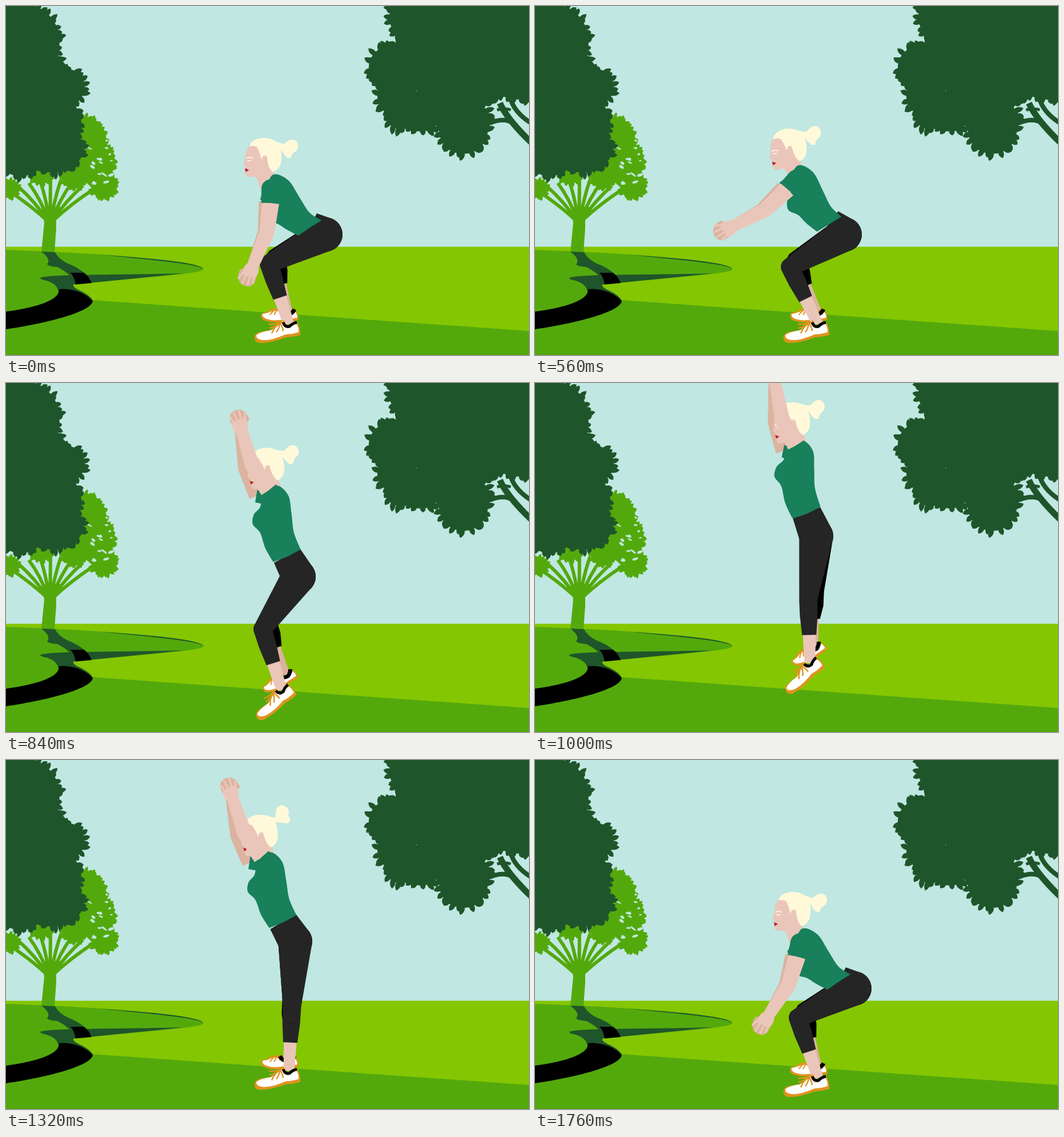
Write an HTML page that moves like this. It is 917 px wide and 611 px high and loops after 1.8 s.

```html
<!DOCTYPE html>
<html lang="en">
<head>
<meta charset="utf-8">
<title>Squat jump</title>
<style>
html, body { margin: 0; width: 100%; height: 100%; overflow: hidden; background: #c0e7e2; }
svg { display: block; width: 100%; height: 100%; }
</style>
</head>
<body>
<svg viewBox="0 0 917 611">
  <rect width="917" height="611" fill="#c0e7e2"/>
  <rect y="421.500" width="917" height="190" fill="#84c602"/>

  <g fill="#53a90c">
    <path d="M0 427C130 431 346 444 346 461C346 470 190 479 118 488Q118 495 135 503L152 515L917 569V611H0Z"/>
    <path id="crown"/>
    <path d="M62 431L67 380L64 352L98 352L88 372L88 390L85 431Z"/>
    <path id="branches" fill="none" stroke="#53a90c" stroke-width="6"/>
  </g>
  <g id="holes" fill="#c0e7e2"></g>

  <g fill="#1f552a">
    <path d="M62 430L86 431Q94 446 116 454Q142 466 150 484L122 487Q116 470 90 457Q74 456 72 452Q80 444 62 430Z"/>
    <path d="M60 476C70 469 200 471 312 468L150 484.500L122 487Q112 488 125 496Q148 506 152 516L92 498Q88 486 72 481Q60 479 60 476Z"/>
    <path d="M170 436C260 442 345 450 346 461C342 452 260 445 170 436Z"/>
    <path id="leftTree"/>
    <path id="rightTree"/>
    <g fill="none" stroke="#1f552a">
      <path stroke-width="11" d="M866 170Q878 198 922 240"/>
      <path stroke-width="8" d="M848 205Q874 194 890 206M884 160Q890 186 922 206"/>
      <path stroke-width="5" d="M861 182Q875 178 885 182M848 208V192"/>
    </g>
  </g>
  <path d="M113 467L137 467Q146 474 150 485L122 487.500Q120 474 113 467Z"/>
  <path d="M92 496C118 493 140 504 152 516C152 534 80 554 0 566V535C68 526 96 510 92 496Z"/>

  <g id="farShoe">
    <path fill="#e0931f" d="M448 538Q458 537 468 530L486 531L506 530Q515 541 512 550L490 553Q465 556 452 550Q445 546 448 538Z"/>
    <path fill="#fff" d="M450 539Q460 538 469 533L486 536L506 534Q512 541 510 546L486 549Q465 552 455 547Q449 544 450 539Z"/>
    <path fill="none" stroke="#e0931f" stroke-width="2" d="M461 533L480 530M463 541Q467 533 475 531M470 541L476 530L481 539"/>
  </g>
  <path id="farShin" fill="#dbb3a0"/>
  <path id="farCollar" fill="none" stroke="#000" stroke-width="7" d="M480 531Q486 541 497 540Q503 537 506 531"/>
  <path id="farLeg"/>
  <path id="farArm" fill="#dbb3a0"/>
  <path id="farSleeve" fill="#18805b"/>

  <g id="head">
    <path fill="#eac6ba" d="M428 242Q419 248 418 262L414.500 277L418 281L417 290L420 298Q429 300 435 297L440 306L444 320L471 314L466 284L450 246Z"/>
    <path fill="#fff9d9" d="M425 245Q428 232 448 230Q462 230 472 237L484 241L480 250Q483 268 478 280Q472 289 465 290Q459 284 457 274L455 262Q449 260 446 268Q442 253 438 246Q431 243 425 245Z"/>
    <path id="bun" fill="#fff9d9" d="M474 238L484 241L491 236Q500 230 507 236Q513 244 507 253Q499 256 497 265Q490 267 486 260Q483 255 480 250Z"/>
    <ellipse cx="451.500" cy="267" rx="4.500" ry="6" fill="#eac6ba"/>
    <path fill="none" stroke="#fff3e6" stroke-width="1.800" d="M419 266Q425 262 431 266M421 270L428 270"/>
    <path fill="#c1202b" d="M417 283L424 286.500L418 290Z"/>
  </g>

  <path id="shin" fill="#eac6ba"/>
  <g id="shoe">
    <path fill="#e0931f" d="M436 578Q438 571 449 570L465 567L482 554L487 550L493 560L510 551Q517 566 516 576Q502 580 491 580Q466 590 444 590Q434 588 436 578Z"/>
    <path fill="#fff" d="M439 576Q447 570 464 568Q476 561 485 553L492 562L508 554Q514 563 513 571Q501 575 490 575Q468 585 452 585Q438 584 439 576Z"/>
    <path fill="none" stroke="#e0931f" stroke-width="2.500" d="M461 557Q472 558 488 553M462 564Q473 562 480 555M466 573Q470 562 480 555M474 571Q479 565 480 555Q485 561 486 569"/>
    <path fill="none" stroke="#000" stroke-width="5" d="M486 554Q489 563 497 561Q503 555 510 554"/>
  </g>
  <path id="leg" fill="#252525"/>
  <path id="shirt" fill="#18805b"/>
  <path id="arm" fill="#eac6ba"/>
  <g id="hand" fill="#eac6ba">
    <path d="M-15 -9Q-17 5 -8 13Q2 19 12 13Q19 5 16 -8Q2 -16 -15 -9Z" fill="#dbb3a0"/>
    <path d="M-7 -22Q-13 -8 -8 -1L14 -2Q20 -10 15 -23Z"/>
    <path d="M-9 -4L-13 6M-2 -4L-4 13M5 -4L6 13M12 -5L14 7" fill="none" stroke="#eac6ba" stroke-width="3.500" stroke-linecap="round"/>
  </g>
  <path id="sleeve" fill="#18805b"/>
</svg>
<script>
const $ = id => document.getElementById(id);
const set = (id, name, value) => $(id).setAttribute(name, value);
const lerp = (a, b, p) => a + (b - a) * p;
const clamp = v => Math.min(1, Math.max(0, v));
const rad = a => a * Math.PI / 180;
const add = (p, q) => [p[0] + q[0], p[1] + q[1]];
const between = (p, q, k) => [lerp(p[0], q[0], k), lerp(p[1], q[1], k)];
const turn = ([x, y], a) => {
  const c = Math.cos(rad(a)), s = Math.sin(rad(a));
  return [x * c - y * s, x * s + y * c];
};

// ---- outlines ----
// Closed smooth outline; listed indices stay sharp
function curve(pts, corners) {
  const n = pts.length;
  const slope = i => corners.includes(i) ? [0, 0]
    : [0, 1].map(k => (pts[(i + 1) % n][k] - pts[(i + n - 1) % n][k]) / 6);
  let d = 'M' + pts[0];
  for (let i = 0; i < n; i++) {
    const j = (i + 1) % n, e = slope(j);
    d += `C${add(pts[i], slope(i))} ${pts[j][0] - e[0]},${pts[j][1] - e[1]} ${pts[j]}`;
  }
  return d + 'Z';
}

const dot = ([x, y], r) => `M${x - r} ${y}a${r} ${r} 0 1 0 ${2 * r} 0a${r} ${r} 0 1 0 ${-2 * r} 0Z`;

// Straight piece from a to b with a half width at each end
function taper(a, ra, b, rb) {
  const dx = b[0] - a[0], dy = b[1] - a[1], len = Math.hypot(dx, dy) || 1;
  const side = r => [-dy / len * r, dx / len * r];
  return `M${add(a, side(ra))}L${add(b, side(rb))}L${add(b, side(-rb))}L${add(a, side(-ra))}Z`;
}

// ---- scenery ----
function random(seed) {
  return () => (seed = (seed * 16807) % 2147483647) / 2147483647;
}

// Round clumps, each fringed with pointed leaves
function foliage(clumps, size, seed) {
  const rnd = random(seed);
  return clumps.map(([x, y, r]) => {
    let d = dot([x, y], r);
    const n = Math.round(r * 8 / size);
    for (let i = 0; i < n; i++) {
      const a = (i + rnd() * 0.6) / n * 360, tilt = a + (rnd() - 0.5) * 80;
      const root = add([x, y], turn([r - 3, 0], a)), l = size * (0.7 + rnd() * 0.6), w = size * 0.55;
      const at = (u, v) => add(root, turn([u, v], tilt)).map(c => c.toFixed(1));
      d += `M${at(0, w / 2)}Q${at(l * 0.6, w)} ${at(l, 0)}Q${at(l * 0.6, -w)} ${at(0, -w / 2)}Z`;
    }
    return d;
  }).join('');
}

set('leftTree', 'd', foliage([[28, 62, 66], [0, 150, 108], [60, 108, 38], [106, 142, 32],
  [84, 205, 48], [104, 252, 31], [82, 256, 36], [26, 250, 48]], 12, 23));
set('rightTree', 'd', foliage([[722, 18, 50], [674, 108, 38], [686, 158, 35], [692, 190, 26], [728, 184, 36],
  [802, 216, 43], [830, 196, 19], [790, 140, 62], [722, 95, 50], [820, 55, 112], [902, 78, 86]], 13, 47));
set('crown', 'd', foliage([[132, 236, 44], [152, 272, 39], [172, 314, 23], [120, 298, 22],
  [60, 290, 22], [6, 320, 16]], 8, 71));

let twigs = '';
for (let i = 0; i < 9; i++) {
  const x = 2 + i * 19, y = 298 + Math.abs(x - 80) * 0.3;
  twigs += `M${70 + i * 1.8} 374Q${lerp(78, x, 0.45)} ${y + 28} ${x} ${y}`;
}
set('branches', 'd', twigs);

const rnd = random(9);
for (let i = 0; i < 16; i++) {
  const x = 146 + rnd() * 40, y = 232 + rnd() * 92;
  $('holes').innerHTML += `<ellipse cx="${x}" cy="${y}" rx="${2 + rnd() * 4}" ry="${1 + rnd() * 1.6}" transform="rotate(${rnd() * 90 - 45} ${x} ${y})"/>`;
}

// ---- motion ----
// Hip place above the ground, then angles in degrees; arm 0 hangs straight down
const crouch = { x: 560, y: 400, lean: -26, foot: 0, head: 0, bun: 0 };
const keys = [
  { t: 0, ...crouch, arm: 18 },
  { t: 80, ...crouch, arm: 18 },
  { t: 320, ...crouch, arm: -35 },
  { t: 560, x: 543, y: 400, lean: -19, foot: 0, head: -9, bun: 0, arm: 58, ease: 1.5 },
  { t: 840, x: 513, y: 339, lean: 0, foot: -26, head: -9, bun: 0, arm: 158, ease: 1.7 },
  { t: 1000, x: 493, y: 314, lean: 5, foot: -28, head: -8, bun: 0, arm: 164, ease: 0.9 },
  { t: 1320, x: 507, y: 330, lean: -2, foot: 0, head: -9, bun: -42, arm: 156 },
  { t: 1520, x: 548, y: 408, lean: -21, foot: 0, head: -4, bun: -46, arm: 110, ease: 0.9 },
  { t: 1760, ...crouch, arm: 28 },
  { t: 1800, ...crouch, arm: 18 }
];

function poseAt(t) {
  const i = keys.findIndex(k => k.t > t), a = keys[i - 1], b = keys[i];
  const p = (t - a.t) / (b.t - a.t), eased = p ** (b.ease || 1), pose = {};
  for (const name in a) pose[name] = lerp(a[name], b[name], name === 'arm' ? p : eased);
  return pose;
}

// Ballistic rise between take-off and landing
const lift = t => Math.max(0, 0.001345 * (t - 900) * (1342 - t));

// ---- figure ----
const BONE = 111.5, FAR_BONE = 96, REACH = 136;
const TOE = [445, 583], FAR_TOE = [455, 545], EAR = [451, 268];

// Upright shirt around the middle of the waist
const shirt = [[-43, -105], [-19, -123], [2, -106], [8, -73], [12, -41], [24, -11], [2, 1], [-24, 11],
  [-38, -13], [-47, -40], [-60, -55], [-58, -72], [-47, -85]];

// Leaning turns the chest more than the waist, shortens the spine and lets the middle sag
function bendTorso([x, y], lean) {
  const h = clamp(-y / 118);
  const p = turn([x, y * (1 + lean * 0.004)], lean * (0.6 + 0.4 * h));
  return [p[0], p[1] - lean * 2.4 * h * (1 - h)];
}

// Forward-bending joint between two equal bones
function kneeOf(hip, ankle, bone) {
  const dx = ankle[0] - hip[0], dy = ankle[1] - hip[1], d = Math.hypot(dx, dy);
  const out = Math.sqrt(Math.max(0, bone * bone - d * d / 4)) / d;
  return add(between(hip, ankle, 0.5), [-dy * out, dx * out]);
}

function legPath(hip, knee, ankle, hemAt, hemR) {
  const calf = between(knee, ankle, 0.26), hem = between(knee, ankle, hemAt);
  return dot(hip, 30) + taper(hip, 30, knee, 16) + dot(knee, 16)
    + taper(knee, 16, calf, 15.5) + taper(calf, 15.5, hem, hemR);
}

function armPath(from, hand, size) {
  const angle = Math.atan2(from[0] - hand[0], hand[1] - from[1]) * 180 / Math.PI;
  const elbow = add(from, turn([10, 52], angle)), wrist = add(hand, turn([4, -18], angle));
  return taper(from, 15 * size, elbow, 13 * size) + dot(elbow, 13 * size)
    + taper(elbow, 13 * size, wrist, 10 * size) + dot(wrist, 10 * size);
}

const place = (to, angle, from) => `translate(${to}) rotate(${angle}) translate(${-from[0]} ${-from[1]})`;

function draw(t) {
  const { x, y, lean, foot, head, bun, arm } = poseAt(t), up = lift(t);
  const hip = [x, y - up];
  const polar = (angle, len) => add(waist, turn([0, -len], angle));

  // legs
  const toe = [TOE[0] - foot * 0.15, TOE[1] - up];
  const farToe = [FAR_TOE[0] - foot * 0.15, FAR_TOE[1] + foot * 0.35 - up];
  const ankle = add(toe, turn([51, -26], foot)), farAnkle = add(farToe, turn([39, -11], foot));
  const knee = kneeOf(hip, ankle, BONE), farKnee = kneeOf(hip, farAnkle, FAR_BONE);
  set('shoe', 'transform', place(toe, foot, TOE));
  set('farShoe', 'transform', place(farToe, foot, FAR_TOE));
  set('farCollar', 'transform', place(farToe, foot, FAR_TOE));
  set('shin', 'd', taper(between(knee, ankle, 0.5), 11.5, ankle, 9.5));
  set('farShin', 'd', taper(between(farKnee, farAnkle, 0.45), 8, farAnkle, 8));
  set('farLeg', 'd', legPath(hip, farKnee, farAnkle, 0.5, 10));

  // trunk
  const waist = add(hip, turn([lean * -0.45 - 42, 0], 61 + lean * 1.3));
  set('leg', 'd', legPath(hip, knee, ankle, 0.56, 12.5) + taper(waist, 26, hip, 30));
  set('shirt', 'd', curve(shirt.map(p => add(waist, bendTorso(p, lean))), [0, 5, 7]));
  set('head', 'transform', place(polar(lean * 0.83 - 12.7, 155 + lean * 0.5), head, EAR));
  set('bun', 'transform', `rotate(${bun} 480 244)`);

  // arms
  const joint = polar(lean * 1.35 - 10.9, 100 + lean * 0.15);
  const hem = add(joint, turn([0, 26 - arm / 30], arm - 18));
  const hand = add(hem, turn([0, REACH], arm));
  const raised = clamp((arm - 60) / 50);
  const farHem = add(hem, [-8 - Math.max(0, arm - 60) * 0.14, raised * 12 - 2]);
  set('arm', 'd', armPath(hem, hand, 1));
  set('hand', 'transform', `translate(${hand}) rotate(${arm})`);
  set('sleeve', 'd', dot(joint, 16) + taper(joint, 16, hem, 16.5));
  set('farArm', 'd', armPath(farHem, hand, 0.85));
  set('farSleeve', 'd', taper(joint, 12, farHem, 11));
}

const start = performance.now();
function tick() {
  draw(Math.floor(((performance.now() - start) % 1800) / 40) * 40);
  requestAnimationFrame(tick);
}
tick();
</script>
</body>
</html>
```
